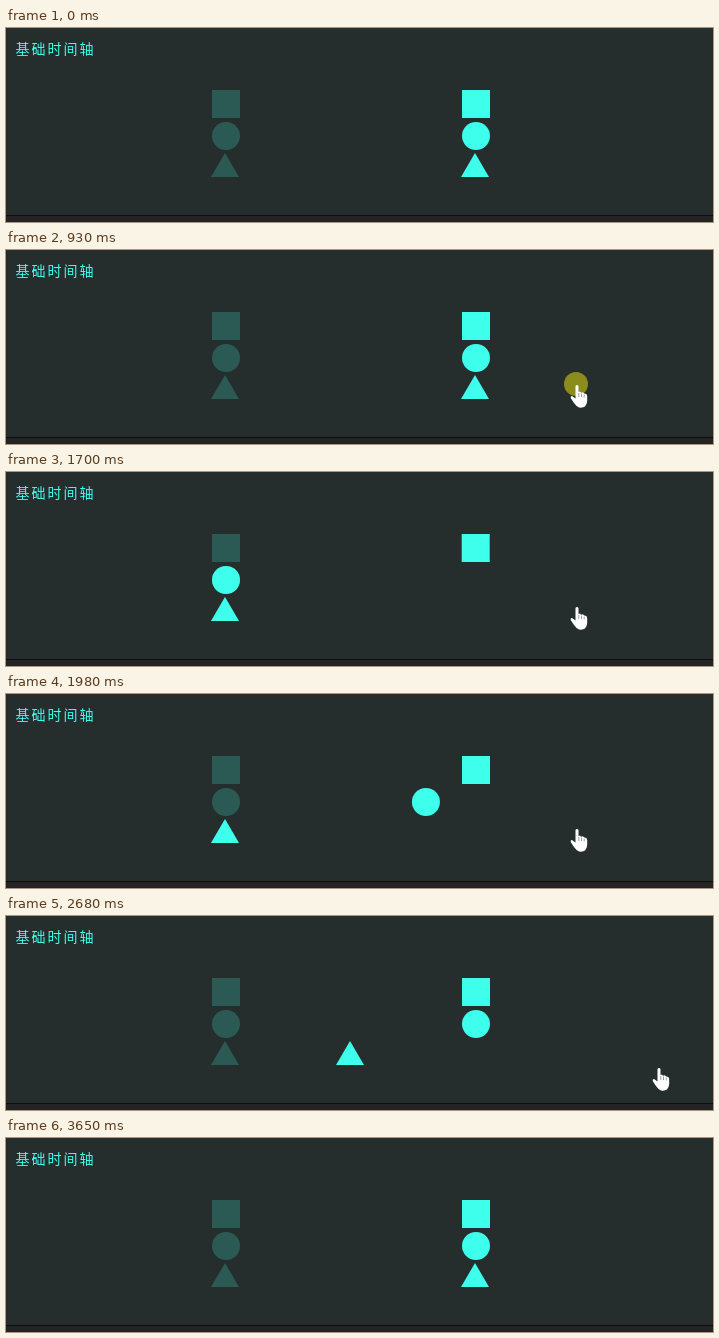
Write an HTML page that moves like this. It is 707x194 px and loops after 3.78 s.

```html
<!DOCTYPE html>
<html lang="zh">
<head>
<meta charset="utf-8">
<style>
  html, body { margin: 0; width: 100%; height: 100%; overflow: hidden; background: #262e2d; }
  svg { display: block; }
  text { font: 14px "Noto Sans CJK SC", "Noto Sans CJK", sans-serif; letter-spacing: 2px; }
</style>
</head>
<body>
<svg width="707" height="194" viewBox="0 0 707 194">
  <defs>
    <rect id="square" x="206" y="62" width="28" height="28"/>
    <circle id="disc" cx="220" cy="108" r="14"/>
    <path id="triangle" d="M219 125L233 149H205Z"/>
  </defs>
  <rect width="707" height="194" fill="#262e2d"/>
  <rect y="187" width="707" height="1" fill="#0d0f0f"/>
  <rect y="188" width="707" height="6" fill="#252424"/>
  <text x="9.5" y="26.3" fill="#3dffec">基础时间轴</text>
  <g fill="#2b5a54">
    <use href="#square"/><use href="#disc"/><use href="#triangle"/>
  </g>
  <g id="shapes" fill="#3dffec">
    <use href="#square"/><use href="#disc"/><use href="#triangle"/>
  </g>
  <circle id="press" cx="570" cy="134" r="12" fill="#8b8c1b"/>
  <g id="hand">
    <path fill="#fff" d="M569.5 136Q571 134 572.5 136V142L574 141.5 575 142.7 577 142.3 578 143.6Q581 143 581.2 146V151Q581 154 579 156.5 577 158 573 157.5 570 156 568 153L565 148.5Q564 146 566 146L569.5 148.5Z"/>
    <path d="M572.8 143V147M575.5 143.5V147M578.2 144.5V147.5" stroke="#596260" stroke-width=".6"/>
  </g>
</svg>
<script>
const LOOP = 3780, TICK = 70, DURATION = 750, TRAVEL = 250, RESET = 1060;
const shapes = document.querySelectorAll('#shapes use');
const hand = document.getElementById('hand');
const press = document.getElementById('press');

// When each shape sets off, its progress at that moment and per tick (ms)
const moves = [
  { at: 1060, first: 30, step: 78 },
  { at: 1840, first: 22, step: 76 },
  { at: 2610, first: 1, step: 74 }
];

// Pointer stops: time, offset x, offset y
const stops = [
  [260, 74, 42], [330, 36, 19], [400, 9, 4], [470, 0, 0],
  [2610, 42, 6], [2680, 82, 17], [2750, 103, 25], [2820, 116, 31], [2890, 123, 36]
];

const easeOutExpo = p => p >= 1 ? 1 : 1 - 2 ** (-10 * p);
const show = (el, on) => el.setAttribute('visibility', on ? 'visible' : 'hidden');
const shift = (el, x, y = 0) => el.setAttribute('transform', `translate(${x} ${y})`);

function offset(t, { at, first, step }) {
  if (t < RESET) return TRAVEL;
  if (t < at) return 0;
  const elapsed = first + step * Math.floor((t - at) / TICK);
  return TRAVEL * easeOutExpo(elapsed / DURATION);
}

function draw(t) {
  moves.forEach((move, i) => shift(shapes[i], offset(t, move)));
  const stop = stops.filter(s => s[0] <= t).pop();
  show(hand, stop && t < 2960);
  if (stop) shift(hand, stop[1], stop[2]);
  show(press, t >= 930 && t < RESET);
}

const start = performance.now();
function frame() {
  draw((performance.now() - start) % LOOP);
  requestAnimationFrame(frame);
}
frame();
</script>
</body>
</html>
```
